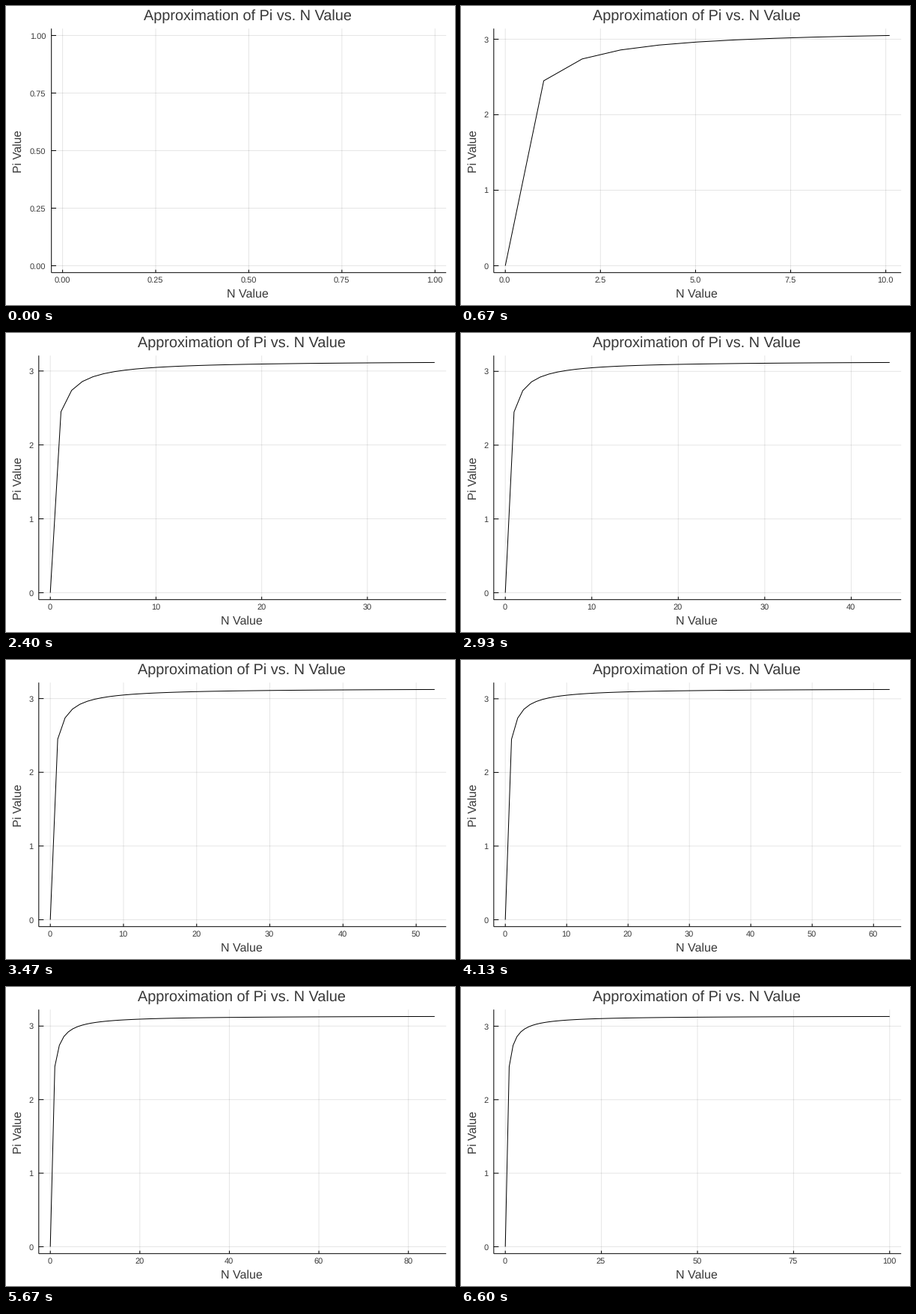
Write a matplotlib script that moves like this. It is 600 by 400 pixels and loops after 6.67 s.

```python
import numpy as np
import matplotlib.pyplot as plt
from matplotlib.animation import FuncAnimation

W, H = 600, 400
PX = 0.72  # points per pixel at 100 dpi
STEPS, STEPS_PER_MS = 100, 0.015
FRAMES, FRAME_MS = 290, 23  # one loop of 6670 ms
TOP, BOTTOM, RIGHT = 30.2, 356.7, 588.2
MARGIN = 0.03
TICK = 0.012
INK = "#383838"

plt.rcParams.update({
    "font.family": "Liberation Sans",
    "text.hinting": "none",
    "path.snap": False,
    "lines.solid_capstyle": "butt",
    "lines.solid_joinstyle": "miter",
})

# Basel series: pi ~ sqrt(6 * sum(1 / k^2))
n_values = np.linspace(0, 100, STEPS)
terms = 1 / np.arange(1, STEPS) ** 2.0
pi_values = np.concatenate([[0], np.sqrt(6 * np.cumsum(terms))])

NICENESS = [(5.0, 0.9), (3.0, 0.2), (2.5, 0.5), (2.0, 0.7), (1.0, 1.0)]


def nice_ticks(top):
    """Best 4 to 8 ticks from zero, scored by count, coverage and roundness."""
    span, limit = top * (1 + 2 * MARGIN), top * (1 + MARGIN)
    best, result = -1, None
    for z in (2, 1, 0, -1, -2):
        for q, nice in NICENESS:
            step = q * 10.0 ** z
            count = int(limit / step + 1e-9) + 1
            if not 4 <= count <= 8:
                continue
            score = ((1 - abs(count - 5) / 5) / 4
                     + 0.5 * span / ((count - 1) * step) + nice / 4)
            if score > best + 1e-9:
                best, result = score, (step, count)
    step, count = result
    digits = next(d for d in range(4) if abs(round(step, d) - step) < 1e-9)
    ticks = step * np.arange(count)
    return ticks, [f"{t:.{digits}f}" for t in ticks]


fig = plt.figure(figsize=(W / 100, H / 100), dpi=100, facecolor="white")
ax = fig.add_axes([0, 0, 1, 1])
shown = None


def line(x, y, **kw):
    ax.plot(x, y, color="black", lw=PX, **kw)


def text(x, y, s, size, ha="center", **kw):
    ax.text(x, y, s, fontsize=size * PX, color=INK, ha=ha, va="baseline", **kw)


def plot(i):
    ax.clear()
    ax.set_axis_off()
    ax.set_xlim(0, W)
    ax.set_ylim(H, 0)

    x_top = n_values[i] or 1.0
    y_top = pi_values[i] or 1.0
    x_ticks, x_labels = nice_ticks(x_top)
    y_ticks, y_labels = nice_ticks(y_top)

    # wider tick labels push the plot area to the right
    decimals = len(y_labels[0].partition(".")[2])
    left = 43.8 + (3.4 + 6.75 * decimals if decimals else 0)
    width, height = RIGHT - left, BOTTOM - TOP

    def to_x(v):
        return left + width * (v / x_top + MARGIN) / (1 + 2 * MARGIN)

    def to_y(v):
        return BOTTOM - height * (v / y_top + MARGIN) / (1 + 2 * MARGIN)

    for x, label in zip(to_x(x_ticks), x_labels):
        line([x, x], [TOP, BOTTOM], alpha=0.1)
        line([x, x], [BOTTOM, BOTTOM - TICK * height])
        text(x - 0.6, 370, label, 11)
    for y, label in zip(to_y(y_ticks), y_labels):
        line([left, RIGHT], [y, y], alpha=0.1)
        line([left, left + TICK * width], [y, y])
        text(left - 7.3, y + 4, label, 11, ha="right")

    line([left, RIGHT], [BOTTOM, BOTTOM])
    line([left, left], [TOP, BOTTOM])
    if i:
        line(to_x(n_values[:i + 1]), to_y(pi_values[:i + 1]))

    middle = (left + RIGHT) / 2 - 1.5
    text(middle, 19, "Approximation of Pi vs. N Value", 19.85)
    text(middle, 390, "N Value", 16)
    text(21, (TOP + BOTTOM) / 2 + 0.6, "Pi Value", 15.6,
         rotation=90, rotation_mode="anchor")


def draw(frame):
    # a step shows in the frame during which it begins
    global shown
    end = (frame + 1) * FRAME_MS - 1
    i = min(int((end + 4) * STEPS_PER_MS), STEPS - 1)
    if i != shown:
        plot(i)
        shown = i
    return []


anim = FuncAnimation(fig, draw, frames=FRAMES, init_func=lambda: [],
                     interval=FRAME_MS, repeat=True, repeat_delay=0,
                     blit=False)
plt.show()
```
